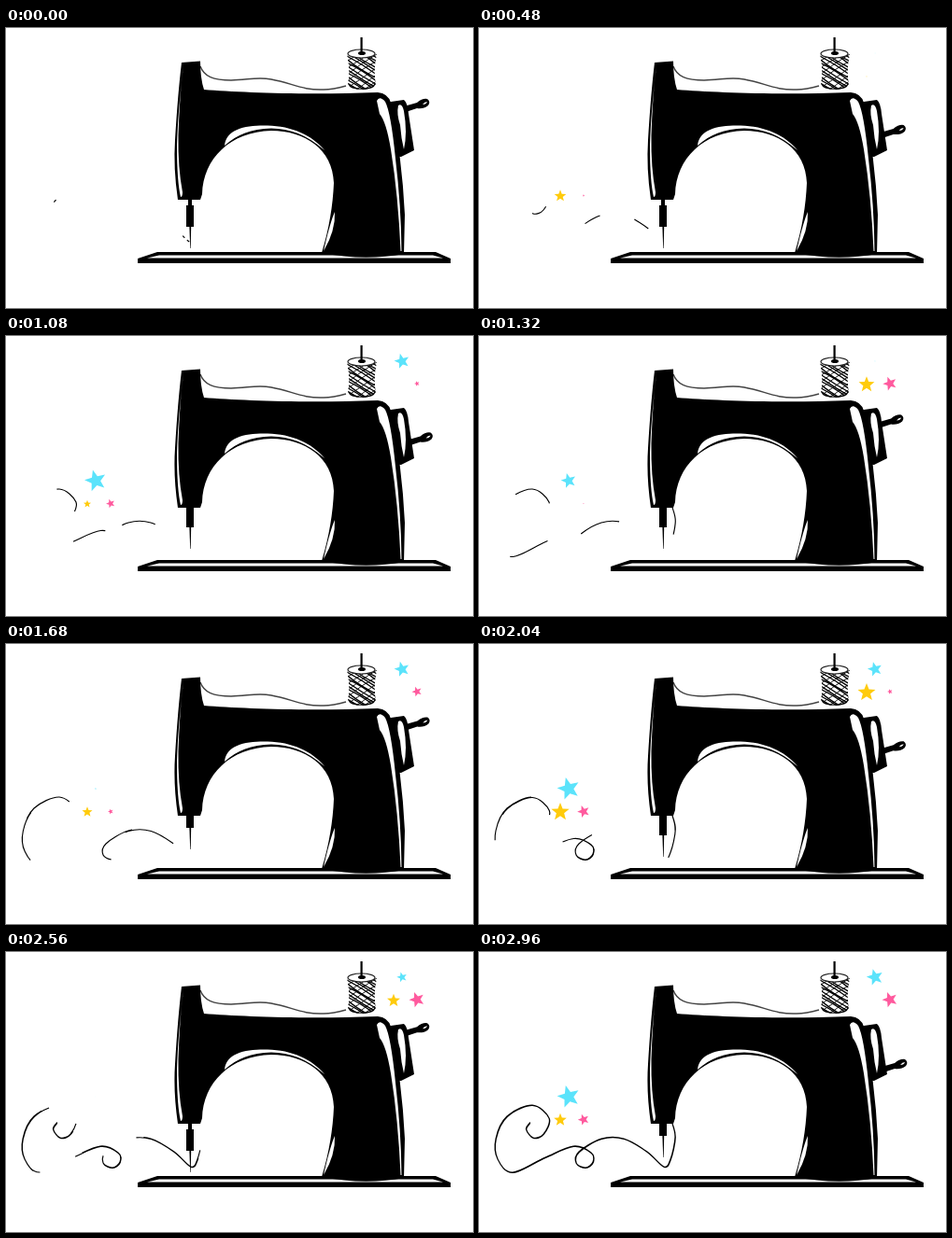
Animation, 500 px wide and 300 px high, one loop 3 s. Source, as an HTML page:

```html
<!DOCTYPE html>
<html lang="en">
<head>
<meta charset="utf-8">
<title>Sewing machine</title>
<style>
html, body { margin: 0; width: 100%; height: 100%; overflow: hidden; background: #fff; }
svg { display: block; width: 500px; height: 300px; }
.line { fill: none; stroke: #000; }
.shine { fill: #fff; }
</style>
</head>
<body>
<svg viewBox="0 0 500 300">
  <defs><clipPath id="spoolBody"><path d="M365 28H397Q393 45 396 61Q381 71 366 61Q369 45 365 28Z"/></clipPath></defs>

  <g id="stars"></g>
  <path id="thread" class="line" stroke-width="1.15" pathLength="960"/>

  <g id="needle">
    <path d="M195 172H199V190H201V213H193V190H195Z"/>
    <path d="M196.4 213H198.2L197.7 236H197.2Z"/>
  </g>

  <path fill="none" stroke="#444" stroke-width="1.5" d="M208 41C212 52 222 56 241 56C258 56 268 52 284 55C306 59 318 67 340 66C350 66 357 64 364 62"/>

  <g id="spool">
    <g id="winding" clip-path="url(#spoolBody)"></g>
    <path class="line" stroke-width="1.2" d="M367 60C369 67 393 67 395 60"/>
    <ellipse cx="380.5" cy="27.5" rx="14.5" ry="4.5" fill="#fff" stroke="#222" stroke-width="1.2"/>
    <ellipse cx="381" cy="27" rx="4" ry="2"/>
    <path class="line" stroke-width="2.2" d="M380.6 10V28"/>
  </g>

  <g id="handle">
    <path d="M426 84L440 80Q446 75 451 76Q455 79 452 83Q447 87 440 86L428 90Z"/>
    <path class="shine" d="M446 82Q448 79 451 79Q450 82 446 82Z"/>
  </g>
  <path d="M405 80L426 77Q430 80 431 92L437 131L423 138L412 137Z"/>
  <path class="shine" d="M420 83Q424 80 426 89Q430 112 426 130Q423 118 422 104Q418 92 420 83Z"/>

  <path d="M141 247L162 240H460L476 247V252H141Z"/>
  <path class="shine" d="M151 246.500L164 243.500H457L468 246.500Z"/>

  <path d="M188 37L208 35.500Q208 54 212 66C250 69 320 72 398 69Q409 70 412 80Q424 138 427 200L426 242Q384 250 338 241C346 215 350 190 351 166C350 130 320 110 284 110C240 111 211 140 210 178L208 184H184Q179 150 181 120Q184 70 188 37Z"/>
  <path class="shine" d="M190 40Q184 90 183 125Q183 165 187 181Q189 181 189 176Q184 150 184.500 115Q186 70 190 40Z"/>
  <path class="shine" d="M234 126C236 108 256 104 280 104.500C306 105 328 115 341 131C322 114 304 108 284 107.500C262 108 248 114 234 126Z"/>
  <path class="shine" d="M397 78Q400 72 406 79Q412 90 417 140Q423 190 423.500 239H422.500Q420 180 412 130Q407 100 400 92Z"/>
  <path class="shine" d="M352 197Q353 217 340 239Q347 208 352 197Z"/>
</svg>
<script>
const LOOP = 3000, STEP = 40, TAU = 2 * Math.PI;
const $ = id => document.getElementById(id);

function add(parent, tag, attrs) {
  const el = document.createElementNS("http://www.w3.org/2000/svg", tag);
  for (const k in attrs) el.setAttribute(k, attrs[k]);
  return parent.appendChild(el);
}

// Smooth curve through a list of points
function spline(pts) {
  const at = i => pts[Math.max(0, Math.min(pts.length - 1, i))];
  let d = "M" + pts[0];
  for (let i = 0; i < pts.length - 1; i++) {
    const [p, a, b, q] = [at(i - 1), at(i), at(i + 1), at(i + 2)];
    d += "C" + [0, 1].map(k => a[k] + (b[k] - p[k]) / 6) + " "
             + [0, 1].map(k => b[k] - (q[k] - a[k]) / 6) + " " + b;
  }
  return d;
}

function starPath(tilt) {
  return "M" + Array.from({ length: 10 }, (_, i) => {
    const r = i % 2 ? 0.43 : 1, a = (i / 10 - 0.25) * TAU + tilt;
    return [r * Math.cos(a), r * Math.sin(a)];
  }).join("L") + "Z";
}

// Swings 0 to 1 and back once per period
const swing = (t, period) => (1 - Math.cos(TAU * t / period)) / 2;

// The thread runs out along its curve and back again, a hair apart
const out = [[206, 181], [210, 198], [205, 222], [198, 230], [180, 214], [155, 200], [131, 200],
  [107, 214], [104, 226], [114, 231], [122, 225], [120, 215], [101, 208], [71, 220], [36, 236],
  [20, 222], [18, 200], [30, 176], [57, 164], [75, 178], [69, 195], [58, 199], [50.5, 190], [54, 183.5]];
const back = out.map(([x, y]) => [x + 0.3, y + 0.5]).reverse();
$("thread").setAttribute("d", spline(out.concat(back)));

// Crossed diagonal windings
for (let i = 0; i < 15; i++) {
  const y = 12 + i * 3.6, bend = 3 * Math.sin(i * 2.4);
  const wind = (y0, y1, width) => add($("winding"), "path", {
    class: "line", "stroke-width": width, d: `M365 ${y0}Q381 ${(y0 + y1) / 2 + bend} 397 ${y1}` });
  wind(y, y + 20, 1.3);
  if (i % 2) wind(y + 20, y - 2, 0.9);
}

const CYAN = "#5be3fb", YELLOW = "#ffcb0b", PINK = "#ff5a9e";
const TILT = { [CYAN]: -0.26, [YELLOW]: 0, [PINK]: -0.35 };
const stars = [
  { x: 96, y: 155, color: CYAN, size: 12.5, period: 920, delay: 680 },
  { x: 87, y: 180, color: YELLOW, size: 10.5, period: 1230, delay: 120 },
  { x: 112, y: 179.5, color: PINK, size: 7, period: 1100, delay: 330 },
  { x: 424, y: 27, color: CYAN, size: 12, period: 950, delay: 430 },
  { x: 415, y: 52, color: YELLOW, size: 10, period: 640, delay: 430 },
  { x: 440, y: 51, color: PINK, size: 8.5, period: 400, delay: 760 }
];
for (const s of stars) s.el = add($("stars"), "path", { d: starPath(TILT[s.color]), fill: s.color });

function draw(t) {
  const dash = 3 + 0.0315 * t, gap = Math.max(0, 415 - 0.1425 * t);
  $("thread").setAttribute("stroke-dasharray", dash + " " + gap);
  $("thread").setAttribute("stroke-dashoffset", -(57 + 0.0427 * t));

  $("needle").setAttribute("transform", `translate(0 ${-16 * swing(t, 160)})`);
  const drop = 41 * swing(t, 111.4);
  $("handle").setAttribute("transform", `translate(${drop * 0.13} ${drop})`);

  for (const s of stars) {
    const r = s.size * swing(Math.max(0, t - s.delay), s.period);
    s.el.setAttribute("transform", `translate(${s.x} ${s.y}) scale(${r})`);
  }
}

const start = performance.now();
function frame() {
  const t = (performance.now() - start) % LOOP;
  draw(Math.floor(t / STEP) * STEP);
  requestAnimationFrame(frame);
}
frame();
</script>
</body>
</html>
```
